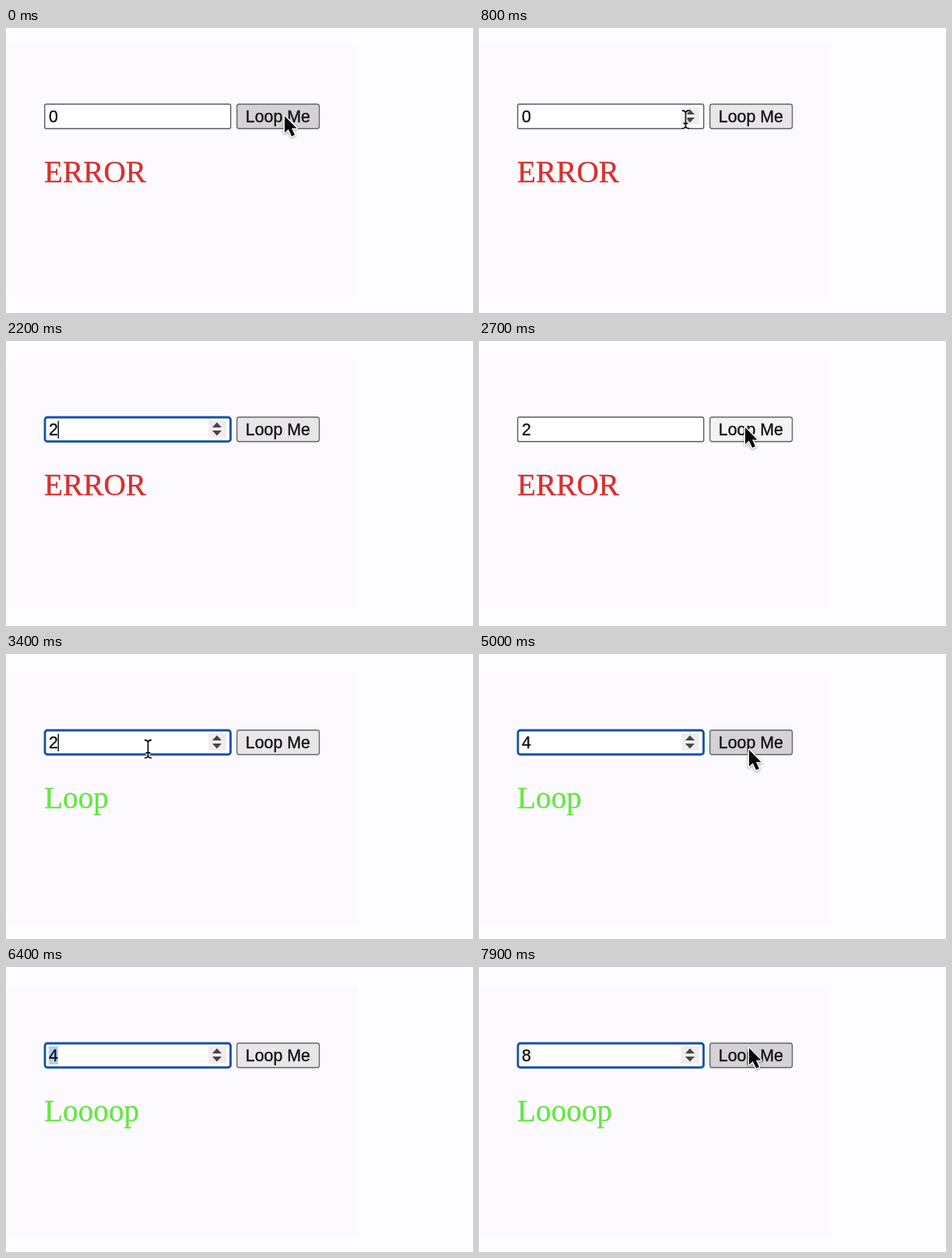
Recreate the animation shown at these times as an HTML page with a canvas. Size 600x366 px, loop 8000 ms.

```html
<!DOCTYPE html>
<html lang="en">
<head>
<meta charset="utf-8">
<title>Loop Me</title>
<style>
  html, body { margin: 0; height: 100%; overflow: hidden; background: #fdfcfe; }
  canvas { display: block; }
</style>
</head>
<body>
<canvas id="stage" width="600" height="366"></canvas>
<script>
const ctx = document.getElementById('stage').getContext('2d');
const DURATION = 8000, STEP = 100;
const SANS = '21.3px "Liberation Sans", Arial, sans-serif';
const SERIF = '39.3px "Liberation Serif", "Times New Roman", serif';

// Each track lists [start time, value]; the value holds until the next entry.
const tracks = {
  digit: [[0, '0'], [2000, '2'], [4200, '4'], [7000, '8']],
  result: [[0, 'ERROR'], [2800, 'Loop'], [5200, 'Loooop']],
  mode: [[0, 'idle'], [1200, 'caret'], [1700, 'select'], [2000, 'caret'], [2700, 'idle'],
    [3300, 'caret'], [3900, 'select'], [4200, 'caret'], [5100, 'idle'],
    [5900, 'caret'], [6100, 'select'], [7000, 'caret']],
  pressed: [[0, false], [2700, true], [2800, false], [5100, true], [5200, false]],
  hidden: [[0, false], [2000, true], [2300, false], [4200, true], [4500, false],
    [6400, true], [7300, false]]
};

// Pointer hot spot: [time, x, y]
const path = [
  [0, 358, 113], [500, 358, 113], [1100, 172, 122], [2300, 172, 122],
  [2600, 342, 111], [2900, 342, 111], [3300, 182, 122], [4500, 182, 122],
  [4900, 347, 123], [5400, 347, 123], [5800, 176, 120], [7300, 176, 120],
  [7600, 290, 94], [7900, 347, 104], [8000, 347, 104]
];

const entryAt = (track, t) => track.filter(([start]) => start <= t).pop();
const inside = ([x, y], left, right) => x >= left && x <= right && y >= 97 && y <= 130;

function pointerAt(t) {
  const i = path.findIndex(([end]) => end > t);
  const [t0, x0, y0] = path[i - 1], [t1, x1, y1] = path[i];
  const u = (t - t0) / (t1 - t0), e = u * u * (3 - 2 * u);
  return [x0 + (x1 - x0) * e, y0 + (y1 - y0) * e];
}

function box(x, y, w, h, radius, fill, border, width) {
  ctx.beginPath();
  ctx.roundRect(x, y, w, h, radius);
  ctx.fillStyle = fill;
  ctx.fill();
  ctx.strokeStyle = border;
  ctx.lineWidth = width;
  ctx.stroke();
}

function rect(x, y, w, h, color) {
  ctx.fillStyle = color;
  ctx.fillRect(x, y, w, h);
}

function text(str, x, y, font, color, align = 'left') {
  ctx.font = font;
  ctx.textAlign = align;
  ctx.fillStyle = ctx.strokeStyle = color;
  ctx.lineWidth = 0.35;
  ctx.fillText(str, x, y);
  ctx.strokeText(str, x, y);
}

function drawSpinner() {
  rect(260, 102, 23, 22, '#eeecef');
  ctx.fillStyle = '#464547';
  ctx.fill(new Path2D('M265 111h12l-6-6.5zM265 115h12l-6 6.5z'));
}

function drawField(digit, mode, hovered, caretOn) {
  const focused = mode !== 'idle';
  if (focused) box(50, 98, 238.5, 31, 3, '#fff', '#1450a6', 2.8);
  else box(49.7, 97.7, 239, 31.6, 2, '#fff', '#5c5b5e', 1.4);
  if (focused || hovered) drawSpinner();
  if (mode === 'select') rect(55, 102, 12, 23, '#acd0f8');
  text(digit, 55, 121, SANS, '#111');
  if (mode === 'caret' && caretOn) rect(66.5, 102.5, 1.5, 22.5, '#111');
}

function drawArrow(x, y) {
  const arrow = new Path2D('M0 0V21.5L4.8 17L9 26L13 24.2L9 15.8H15.5Z');
  ctx.save();
  ctx.translate(x, y);
  ctx.lineJoin = 'round';
  ctx.shadowColor = '#0006';
  ctx.shadowBlur = 3;
  ctx.shadowOffsetY = 1;
  ctx.strokeStyle = '#fff';
  ctx.lineWidth = 3;
  ctx.stroke(arrow);
  ctx.shadowColor = 'transparent';
  ctx.fillStyle = '#080808';
  ctx.fill(arrow);
  ctx.restore();
}

function drawBeam(x, y) {
  const beam = new Path2D('M-4.5 -11.5Q0 -11.5 0 -8Q0 -11.5 4.5 -11.5M0 -8V8M-3 5H3M-4.5 11.5Q0 11.5 0 8Q0 11.5 4.5 11.5');
  ctx.save();
  ctx.translate(x + 0.5, y);
  for (const [color, width] of [['#fff', 4], ['#151515', 1.8]]) {
    ctx.strokeStyle = color;
    ctx.lineWidth = width;
    ctx.stroke(beam);
  }
  ctx.restore();
}

function draw(t) {
  const get = name => entryAt(tracks[name], t)[1];
  const pointer = pointerAt(t);
  const overField = inside(pointer, 49, 290), overButton = inside(pointer, 296, 403);
  const [modeStart, mode] = entryAt(tracks.mode, t);
  const caretOn = (t - modeStart) % 1000 < 500;
  const result = get('result');

  rect(0, 0, 600, 366, '#fdfcfe');
  rect(2, 24, 450, 320, '#fcfafe');
  drawField(get('digit'), mode, overField && !get('hidden'), caretOn);

  const face = get('pressed') ? '#f3f2f4' : overButton ? '#d4d2d6' : '#e8e6e9';
  box(296.7, 97.7, 105.8, 31.6, 3, face, '#68676a', 1.4);
  text('Loop Me', 349.3, 121, SANS, '#111', 'center');
  text(result, 49, 198, SERIF, result === 'ERROR' ? '#d8302f' : '#64e742');

  if (!get('hidden')) (overField ? drawBeam : drawArrow)(...pointer);
}

function frame() {
  const t = performance.now() % DURATION;
  draw(Math.floor(t / STEP) * STEP);
  requestAnimationFrame(frame);
}
frame();
</script>
</body>
</html>
```
